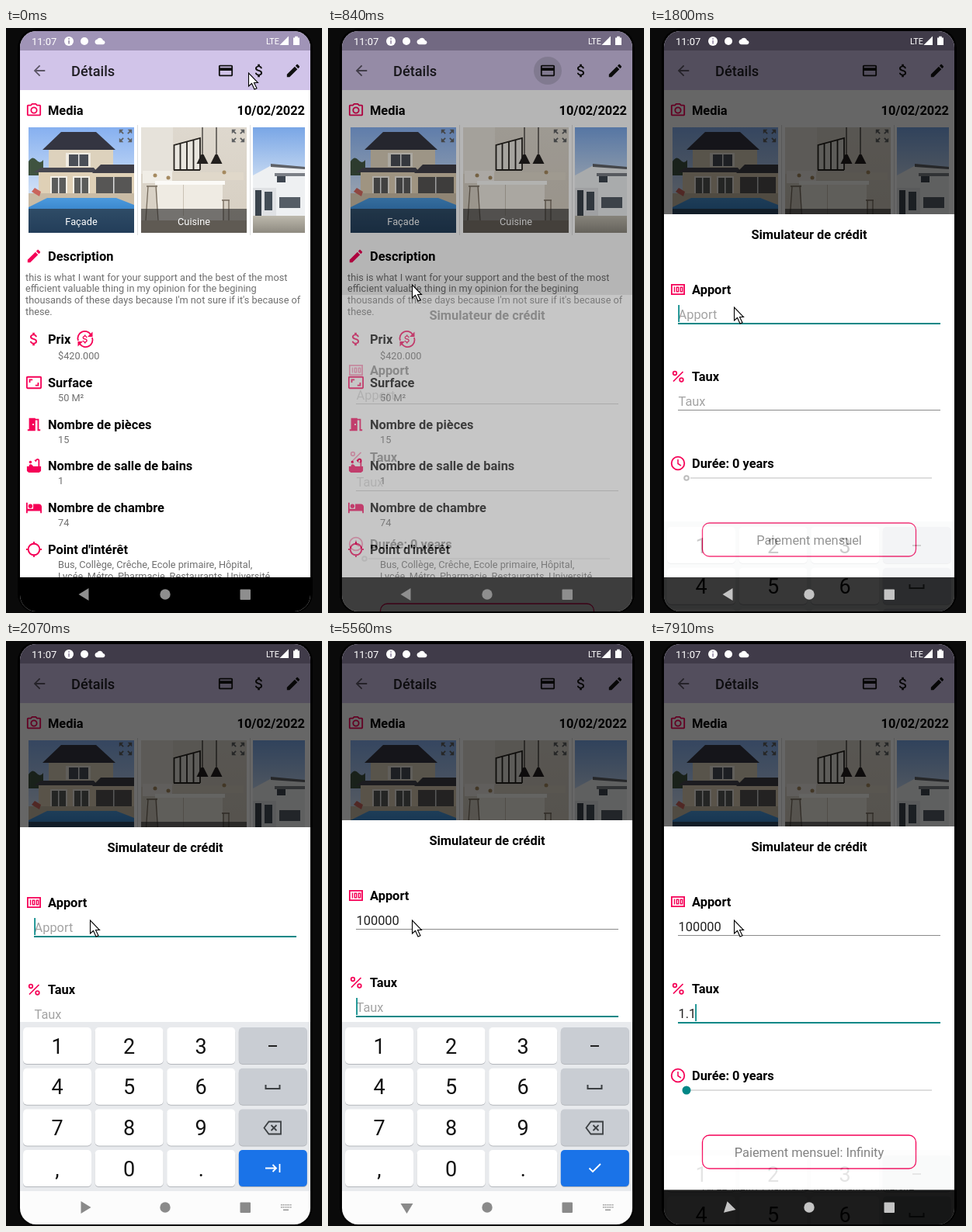
These frames come from a looping animation (407x754 px, 8 s). An HTML page with a canvas:

```html
<!DOCTYPE html>
<html lang="fr">
<head>
<meta charset="utf-8">
<title>Simulateur de crédit</title>
<style>
html, body { margin: 0; width: 100%; height: 100%; overflow: hidden; background: #000; }
canvas { display: block; }
</style>
</head>
<body>
<canvas id="stage" width="407" height="754"></canvas>
<script>
const stage = document.getElementById('stage');
const main = stage.getContext('2d'), layer = stage.cloneNode().getContext('2d');
let ctx = main;
const LOOP = 8000, PINK = '#f50057', TEAL = '#018786', GREY = '#6f6f6f', BODY = 12.74, LARGE = 16.4;

// 24-unit icon outlines
const ICONS = {
  back: 'M20 11H7.83l5.59-5.59L12 4l-8 8 8 8 1.41-1.41L7.83 13H20z',
  card: 'M20 4H4c-1.1 0-2 .9-2 2v12c0 1.1.9 2 2 2h16c1.1 0 2-.9 2-2V6c0-1.1-.9-2-2-2zm0 14H4v-6h16zm0-10H4V6h16z',
  money: 'M11.8 10.9c-2.27-.59-3-1.2-3-2.15 0-1.09 1.01-1.85 2.7-1.85 1.78 0 2.44.85 2.5 2.1h2.21c-.07-1.72-1.12-3.3-3.21-3.81V3h-3v2.16c-1.94.42-3.5 1.68-3.5 3.61 0 2.31 1.91 3.46 4.7 4.13 2.5.6 3 1.48 3 2.41 0 .69-.49 1.79-2.7 1.79-2.06 0-2.87-.92-2.98-2.1h-2.2c.12 2.19 1.76 3.42 3.68 3.83V21h3v-2.15c1.95-.37 3.5-1.5 3.5-3.55 0-2.84-2.43-3.81-4.7-4.4z',
  edit: 'M3 17.25V21h3.75L17.81 9.94l-3.75-3.75zM20.71 7.04c.39-.39.39-1.02 0-1.41l-2.34-2.34c-.39-.39-1.02-.39-1.41 0l-1.83 1.83 3.75 3.75z',
  camera: 'M20 4h-3.17L15 2H9L7.17 4H4c-1.1 0-2 .9-2 2v12c0 1.1.9 2 2 2h16c1.1 0 2-.9 2-2V6c0-1.1-.9-2-2-2zm0 14H4V6h4.05l1.83-2h4.24l1.83 2H20zM12 7a5 5 0 1 0 0 10 5 5 0 0 0 0-10zm0 8a3 3 0 1 1 0-6 3 3 0 0 1 0 6z',
  area: 'M19 12h-2v3h-3v2h5zM7 9h3V7H5v5h2zm14-6H3c-1.1 0-2 .9-2 2v14c0 1.1.9 2 2 2h18c1.1 0 2-.9 2-2V5c0-1.1-.9-2-2-2zm0 16H3V5h18z',
  door: 'M14 6v15H3v-2h2V3h9v1h5v15h2v2h-4V6zm-4 5v2h2v-2z',
  bath: 'M7 5a2 2 0 1 0 0 4 2 2 0 0 0 0-4zM20 13V4.83C20 3.27 18.73 2 17.17 2c-.75 0-1.47.3-2 .83l-1.25 1.25c-.16-.05-.33-.08-.51-.08-.4 0-.77.12-1.08.32l2.76 2.76c.2-.31.32-.68.32-1.08 0-.18-.03-.34-.07-.51l1.25-1.25c.15-.15.36-.24.58-.24.46 0 .83.37.83.83V13h-6.85c-.3-.21-.57-.45-.82-.72l-1.4-1.55c-.19-.21-.43-.38-.69-.5-.31-.15-.65-.23-1-.23C6 10 5 11 5 12.25V13H2v6c0 1.1.9 2 2 2 0 .55.45 1 1 1h14c.55 0 1-.45 1-1 1.1 0 2-.9 2-2v-6z',
  bed: 'M7 13a3 3 0 1 0 0-6 3 3 0 0 0 0 6zm12-6h-8v7H3V5H1v15h2v-3h18v3h2v-9c0-2.21-1.79-4-4-4z',
  target: 'M20.94 11c-.46-4.17-3.77-7.48-7.94-7.94V1h-2v2.06C6.83 3.52 3.52 6.83 3.06 11H1v2h2.06c.46 4.17 3.77 7.48 7.94 7.94V23h2v-2.06c4.17-.46 7.48-3.77 7.94-7.94H23v-2zM12 19a7 7 0 1 1 0-14 7 7 0 0 1 0 14z',
  expand: 'M15 3l2.3 2.3-2.89 2.87 1.42 1.42L18.7 6.7 21 9V3zM3 9l2.3-2.3 2.87 2.89 1.42-1.42L6.7 5.3 9 3H3zm6 12l-2.3-2.3 2.89-2.87-1.42-1.42L5.3 17.3 3 15v6zm12-6l-2.3 2.3-2.87-2.89-1.42 1.42 2.89 2.87L15 21h6z',
  cloud: 'M19.35 10.04C18.67 6.59 15.64 4 12 4 9.11 4 6.6 5.64 5.35 8.04 2.34 8.36 0 10.91 0 14c0 3.31 2.69 6 6 6h13c2.76 0 5-2.24 5-5 0-2.64-2.05-4.78-4.65-4.96z'
};
for (const name in ICONS) ICONS[name] = new Path2D(ICONS[name]);

// ---- drawing helpers ----
function icon(name, cx, cy, color, scale = .91) {
  ctx.save();
  ctx.translate(cx, cy);
  ctx.scale(scale, scale);
  ctx.translate(-12, -12);
  ctx.fillStyle = color;
  ctx.fill(ICONS[name], 'evenodd');
  ctx.restore();
}
function rect(x, y, w, h, color) {
  ctx.fillStyle = color;
  ctx.fillRect(x, y, w, h);
}
function shape(path, color) {
  ctx.fillStyle = color;
  ctx.fill(new Path2D(path));
}
function line(path, color, width = 1) {
  ctx.strokeStyle = color;
  ctx.lineWidth = width;
  ctx.stroke(new Path2D(path));
}
function rounded(x, y, w, h, r, color) {
  ctx.beginPath();
  ctx.roundRect(x, y, w, h, r);
  if (color) { ctx.fillStyle = color; ctx.fill(); }
}
function circle(x, y, r, fill, stroke, width) {
  ctx.beginPath();
  ctx.arc(x, y, r, 0, 7);
  if (fill) { ctx.fillStyle = fill; ctx.fill(); }
  if (stroke) { ctx.strokeStyle = stroke; ctx.lineWidth = width; ctx.stroke(); }
}
function text(str, x, y, size, color, weight = 400, align = 'left') {
  ctx.font = `${weight} ${size}px Roboto, sans-serif`;
  ctx.textAlign = align;
  ctx.fillStyle = color;
  ctx.fillText(str, x, y);
}
const heading = (str, cy, x = 54, align) => text(str, x, cy + 6, LARGE, '#000', 700, align);
function gradient(x, y, w, h, top, bottom) {
  const g = ctx.createLinearGradient(0, y, 0, y + h);
  g.addColorStop(0, top);
  g.addColorStop(1, bottom);
  rect(x, y, w, h, g);
}
// Paints a group on its own layer, then fades it in as a whole.
function fade(alpha, paint) {
  ctx = layer;
  ctx.clearRect(0, 0, 407, 754);
  paint();
  ctx = main;
  ctx.globalAlpha = alpha;
  ctx.drawImage(layer.canvas, 0, 0);
  ctx.globalAlpha = 1;
}

// ---- timing helpers ----
const ramp = (t, a, b) => Math.min(1, Math.max(0, (t - a) / (b - a)));
const TICKS = [0, 150, 290, 430, 570, 700, 840, 990, 1110, 1230, 1370, 1500, 1640, 1780, 1930, 2070, 2190,
  5410, 5560, 7670, 7790, 7910];
const hold = t => TICKS.findLast(tick => tick <= t);
const typed = (str, times, t) => str.slice(0, times.filter(at => at <= t).length);
const CARET_OFF = [[2340, 2620], [4140, 4450], [4850, 5410], [5840, 6120], [7110, 7670]];
const POINTER = [[0, 312, 58], [290, 284, 60], [570, 284, 60], [840, 108, 331], [990, 102, 401], [1230, 108, 360]];
function pointerAt(t) {
  const i = POINTER.findLastIndex(p => p[0] <= t);
  const a = POINTER[i], b = POINTER[i + 1] || a;
  const k = b === a ? 0 : ramp(t, a[0], b[0]);
  return [a[1] + (b[1] - a[1]) * k, a[2] + (b[2] - a[2]) * k];
}

// ---- photos ----
function housePhoto() {
  gradient(29, 128, 136, 87, '#86b0f0', '#d3e2f6');
  shape('M29 172q5-8 10-2t9 0v20H29z', '#3f5340');
  rect(55, 155, 83, 29, '#ddd2bd');
  shape('M47 157l24-23h45l25 23z', '#343541');
  rect(77, 161, 32, 18, '#f0ece2');
  rect(81, 163, 25, 15, '#4a4f57');
  rect(93, 163, 1.5, 15, '#eee');
  rect(42, 184, 123, 31, '#dfd0b6');
  shape('M36 186l9-6h68l5 6z', '#474750');
  shape('M111 187l11-11h43v11z', '#3f3e47');
  for (const x of [57, 86]) {
    rect(x, 191, 22, 23, '#f3efe6');
    rect(x + 2, 193, 18, 21, '#5b5c5b');
    rect(x + 10, 193, 1.5, 21, '#eee');
  }
  rect(116, 192, 46, 21, '#575655');
  rect(138, 192, 1.5, 21, '#ddd');
  rect(29, 213, 136, 10, '#c9bba5');
  gradient(29, 219, 136, 45, '#4b9ade', '#1c63ad');
  shape('M29 219h24L29 231zM142 219h23v9z', '#c9bba5');
  shape('M33 211l4-5 8 5-2 6z', '#c9645c');
}
function kitchenPhoto() {
  gradient(174, 128, 136, 136, '#ded8ce', '#d6cec1');
  rect(174, 128, 41, 60, '#e6e2da');
  shape('M216 151l34-9v41h-34z', '#e9e6df');
  line('M216.500 183V151L250 142V183M224.500 183V149M233 183V147M241.500 183V145M216 183h34', '#26231f', 1.8);
  rect(176, 184, 38, 16, '#f0ede6');
  rect(214, 186, 92, 10, '#e0d8ca');
  for (const x of [253, 271]) {
    line(`M${x} 128V164`, '#2b2825', 1.2);
    shape(`M${x - 1.5} 163h3l6 12h-15z`, '#221f1d');
  }
  for (const [x, y] of [[192, 190], [209, 193], [281, 186]]) circle(x, y, 2.5, '#a58a60');
  rect(192, 197, 90, 5, '#fbfaf7');
  rect(195, 202, 84, 47, '#efebe3');
  rect(228, 202, 1, 40, '#c9c1b4');
  line('M181 204h14M183 204l-3 44M193 204l3 44M278 222h10M280 222v28M287 222v28', '#766b5d', 1.3);
  rect(174, 248, 136, 16, '#bbae9c');
}
function villaPhoto() {
  gradient(318, 128, 67, 87, '#79a6e6', '#e0eaf5');
  shape('M318 190l24-13 43 4v62h-67z', '#eef0f2');
  shape('M341 175l44 4v3l-44-3z', '#5f6268');
  rect(346, 187, 39, 4, '#7b7f86');
  rect(349, 191, 11, 8, '#3e4650');
  rect(318, 206, 30, 38, '#dfe1e4');
  rect(321, 209, 8, 33, '#39424b');
  rect(333, 211, 10, 24, '#434d57');
  rect(352, 218, 27, 14, '#555d66');
  gradient(318, 242, 67, 22, '#bdb9ad', '#8e8a80');
}
function caption(str, x) {
  rect(x, 233, 136, 31, 'rgba(40,40,40,.62)');
  text(str, x + 68, 253.500, BODY, '#fff', 400, 'center');
  icon('expand', x + 125, 139, '#5f6163');
}

// ---- main page ----
function exchangeIcon(cx, cy) {
  ctx.save();
  ctx.translate(cx, cy);
  icon('money', 0, 0, PINK, .62);
  for (let i = 0; i < 2; i++) {
    line('M-9 2A9 9 0 0 1 7 -6', PINK, 1.8);
    shape('M9.500 -9.500V-3H3z', PINK);
    ctx.rotate(Math.PI);
  }
  ctx.restore();
}
function page(ripple) {
  rect(18, 4, 374, 748, '#fff');
  rect(18, 4, 374, 25, '#a094b7');
  rect(18, 29, 374, 51, '#d1c4e9');
  if (ripple) circle(283, 55, 18, 'rgba(0,0,0,.13)');
  icon('back', 43, 55, '#5c5666');
  text('Détails', 84, 62, 18.2, '#1f1d23', 500);
  icon('card', 283, 55, '#111');
  icon('money', 326, 55, '#111');
  icon('edit', 370, 55, '#111');

  icon('camera', 36, 106, PINK);
  heading('Media', 106);
  heading('10/02/2022', 106, 385, 'right');
  housePhoto();
  kitchenPhoto();
  villaPhoto();
  caption('Façade', 29);
  caption('Cuisine', 174);
  for (const x of [169, 314]) rect(x, 125, 1, 142, '#dedede');

  icon('edit', 36, 294, PINK);
  heading('Description', 294);
  ['this is what I want for your support and the best of the most',
    'efficient valuable thing in my opinion for the begining',
    "thousands of these days because I'm not sure if it's because of",
    'these.'].forEach((row, i) => text(row, 25, 325.500 + i * 14.9, BODY, GREY));

  [['money', 'Prix', 401, '$420.000'], ['area', 'Surface', 457, '50 M²'],
    ['door', 'Nombre de pièces', 511, '15'], ['bath', 'Nombre de salle de bains', 564, '1'],
    ['bed', 'Nombre de chambre', 618, '74'],
    ['target', "Point d'intérêt", 672, 'Bus, Collège, Crêche, Ecole primaire, Hôpital,']
  ].forEach(([name, title, y, value], i) => {
    icon(name, 36, y, PINK);
    heading(title, y);
    text(value, 67, y + (i ? 24 : 26), BODY, GREY);
  });
  text('Lycée, Métro, Pharmacie, Restaurants, Université', 67, 710.500, BODY, GREY);
  exchangeIcon(102, 401);
  rect(18, 708, 374, 44, '#000');
}

// ---- credit sheet ----
function field(title, cy, hint, value, focused, caretOn) {
  heading(title, cy);
  text(value || hint, 36.5, cy + 37.5, LARGE, value ? '#222' : '#a3a3a3');
  if (caretOn) rect(36 + (value ? ctx.measureText(value).width - .5 : .3), cy + 20, 1.7, 22, TEAL);
  if (focused) rect(36, cy + 43, 338, 2, TEAL);
  else rect(36, cy + 43, 338, 1, '#8a8a8a');
}
function sheet(y, t) {
  const apport = typed('100000', [2620, 2900, 3150, 3450, 3700, 4450], t);
  const taux = typed('1.1', [6120, 6400, 6550], t);
  const onApport = t >= 1500 && t < 5410, onTaux = t >= 5410;
  const caretOn = !CARET_OFF.some(([a, b]) => t >= a && t < b);
  ctx.save();
  ctx.translate(0, y - 240);
  rect(18, 240, 374, 468, '#fff');
  heading('Simulateur de crédit', 266, 205, 'center');

  line('M27.900 330.900h16.200v12.200H27.900z', PINK, 1.8);
  line('M31.500 333.500v7M34.300 334.200h2.400v5.600h-2.400zM39.300 334.200h2.400v5.600h-2.400z', PINK, 1.4);
  field('Apport', 337, 'Apport', apport, onApport, onApport && caretOn);

  line('M30 455.500L42.500 443', PINK, 1.7);
  circle(32, 445, 2.3, null, PINK, 1.7);
  circle(40.500, 453.500, 2.3, null, PINK, 1.7);
  field('Taux', 449, 'Taux', taux, onTaux, onTaux && caretOn);

  circle(36, 561, 8.3, null, PINK, 1.8);
  line('M36 556v5.500l4 2.600', PINK, 1.5);
  heading('Durée: 0 years', 561);
  rect(52, 579, 311, 2, '#dedede');
  if (taux) circle(47, 580, 5.5, TEAL);
  else circle(47, 580, 2.8, '#fff', '#bdbdbd', 2);

  rounded(67.500, 638, 275, 43, 9);
  ctx.strokeStyle = PINK;
  ctx.lineWidth = 1.3;
  ctx.stroke();
  text('Paiement mensuel' + (taux ? ': Infinity' : ''), 205, 666, LARGE, '#777', 400, 'center');
  ctx.restore();
}

// ---- keyboard ----
function keyboard(dy, done) {
  ctx.save();
  ctx.translate(0, dy);
  rect(18, 491, 374, 218, '#e8eaed');
  rect(18, 709, 374, 50, '#fcfcfc');
  const labels = '123-456 789 ,0. ';
  for (let i = 0; i < 16; i++) {
    const col = i % 4, row = i >> 2, x = 22 + col * 92.6, y = 498 + row * 52.7;
    rounded(x, y + 1, 88, 47, 5, '#b4b7bc');
    rounded(x, y, 88, 47, 5, i === 15 ? '#1a73e8' : col === 3 ? '#c9cdd3' : '#fff');
    if (col < 3) text(labels[i], x + 44, y + 33.5, 27, '#111', 400, 'center');
  }
  const ink = '#3c4043';
  rect(338, 521, 11, 2, '#222');
  line('M334.500 572v5h18v-5', ink, 2);
  line('M332.500 627.500l6-8h15.500v16h-15.500zM341.500 624l7 7M348.500 624l-7 7', ink, 1.8);
  if (done) line('M336.500 679.500l4.500 4.500 10-10', '#fff', 1.8);
  else line('M334 679.500h14M343.500 675l4.500 4.500-4.500 4.500M352.500 674v11', '#fff', 1.8);
  ctx.restore();
}

// ---- system bars and pointer ----
function statusIcons() {
  text('11:07', 33, 22, 13, '#fff');
  circle(81, 17, 6, '#fff');
  rect(80.3, 16, 1.5, 4.500, '#8d829f');
  rect(80.3, 13.2, 1.5, 1.6, '#8d829f');
  circle(101, 17, 5, '#fff');
  icon('cloud', 121, 17, '#fff', .54);
  text('LTE', 335, 21, 10.8, '#fff');
  shape('M364 10.500v11.500h-11.500z', '#fff');
  shape('M370 12.500h2.200v-1.700h3.600v1.700h2.200v9.500h-8z', '#fff');
}
function navIcons(turn, keyboardOpen) {
  const color = keyboardOpen > .5 ? '#8a8a8a' : keyboardOpen > 0 ? '#c4c4c4' : '#8e8e8e';
  ctx.save();
  ctx.translate(101.5, 730);
  ctx.rotate(turn * Math.PI * 1.5);
  shape('M-8 0L5 -8V8z', color);
  ctx.restore();
  circle(205, 730, 6.7, color);
  rounded(301.5, 723.5, 13.5, 13.5, 1, color);
  if (keyboardOpen > .5) {
    for (let i = 0; i < 12; i++) rect(354 + (i % 6) * 2.4, 726 + (i > 5) * 3, 1.5, 1.6, '#9a9a9a');
    rect(357, 732.5, 7, 1.6, '#9a9a9a');
  }
}
function pointer(x, y) {
  ctx.save();
  ctx.translate(x + .5, y);
  const arrow = 'M0 0V17L4 13.500L7.500 21L10.500 19.700L7 12.500H12z';
  shape(arrow, '#fff');
  line(arrow, '#000', 1.1);
  ctx.restore();
}

function draw(t) {
  const q = hold(t);
  const dim = .6 * ramp(q, 700, 990);
  const shown = ramp(q, 793, 990);
  const closing = ramp(q, 7680, 7938);
  const keys = ramp(q, 1700, 2070) - closing;
  const turn = ramp(q, 1830, 2190) - ramp(q, 7680, 8000);
  const lift = Math.round(9 * (ramp(q, 5300, 5560) - closing));

  rect(0, 0, 407, 754, '#0a0a0a');
  rounded(15, 1, 380, 753, 25, '#000');
  ctx.save();
  rounded(18, 4, 374, 748, 21);
  ctx.clip();
  page(q >= 570 && q < 990);
  rect(18, 4, 374, 748, `rgba(0,0,0,${dim})`);
  if (shown) fade(shown, () => sheet(240 + Math.round(137 * (1 - shown)) - lift, t));
  if (keys > 0) fade(keys, () => keyboard(Math.round(185 * (1 - keys)), t >= 5560));
  statusIcons();
  navIcons(turn, keys);
  ctx.restore();
  pointer(...pointerAt(q));
}

function tick() {
  draw(performance.now() % LOOP);
  requestAnimationFrame(tick);
}
tick();
</script>
</body>
</html>
```
